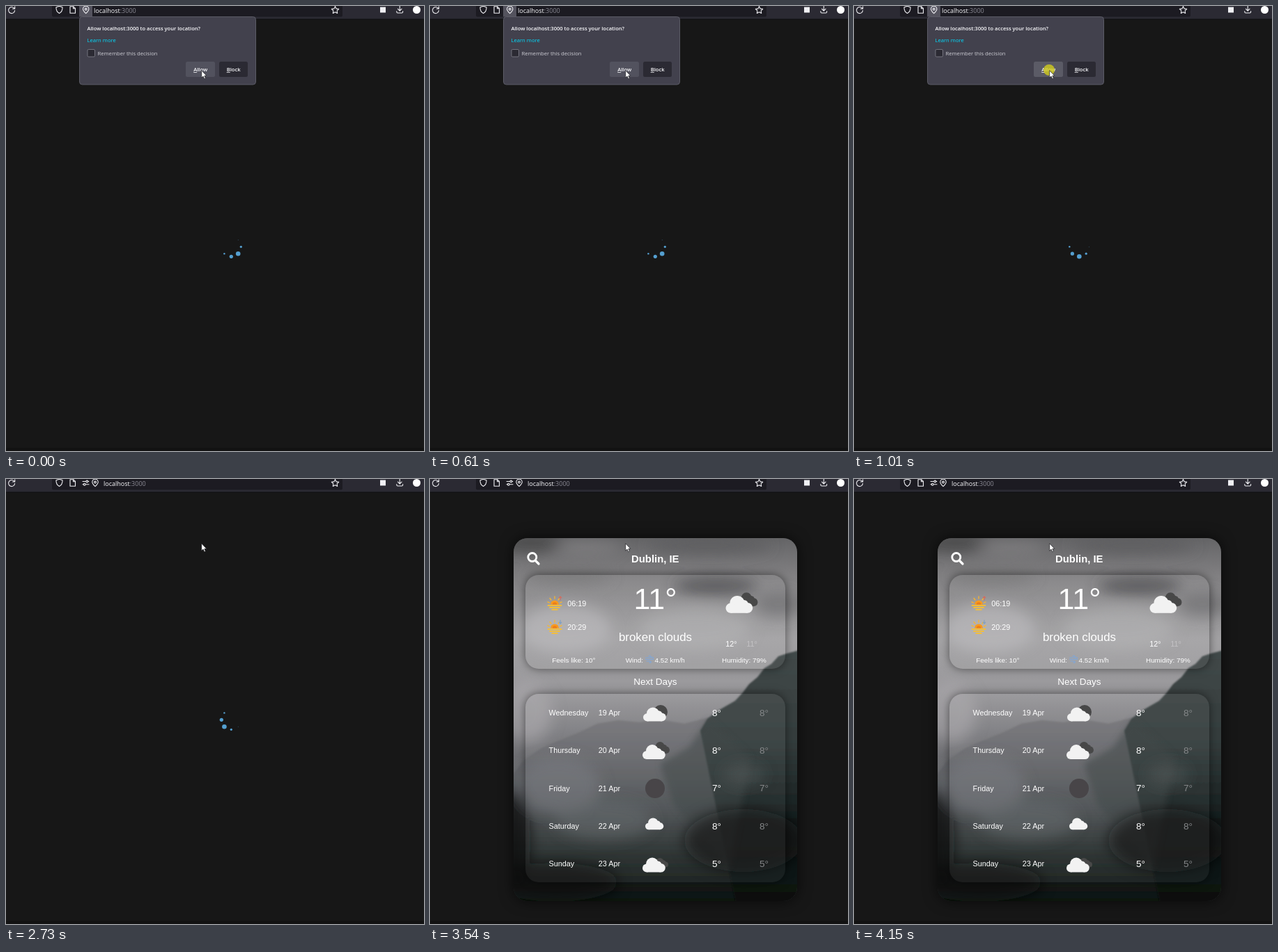
Write an HTML page that moves like this. It is 600 by 640 pixels and loops after 4.55 s.

```html
<!DOCTYPE html>
<html lang="en">
<head>
<meta charset="utf-8">
<title>Weather</title>
<style>
  html, body { margin: 0; width: 100%; height: 100%; overflow: hidden; background: #171717; }
  #stage { position: relative; width: 600px; height: 640px; overflow: hidden; }
  #stage > svg { position: absolute; left: 0; top: 0; }
  #card { position: absolute; left: 120px; top: 85px; width: 407px; height: 522px; border-radius: 20px; overflow: hidden; }
  #shade { position: absolute; left: 120px; top: 85px; width: 407px; height: 522px; border-radius: 20px; box-shadow: 0 0 20px rgba(0,0,0,.65); }
  .panel { position: absolute; left: 17px; width: 373px; border-radius: 19px; background: rgba(255,255,255,.05); box-shadow: 0 0 13px rgba(0,0,0,.5); }
  .ui { font-family: "Open Sans", "Noto Sans", sans-serif; fill: #fbfbfe; }
  .app { font-family: "Liberation Sans", Arial, sans-serif; fill: #fff; }
  .line { fill: none; stroke: #f0f0f4; stroke-width: 1.1; stroke-linecap: round; stroke-linejoin: round; }
  .key { text-decoration: underline; }
</style>
</head>
<body>
<div id="stage">
  <div id="weather">
    <div id="shade"></div>
    <div id="card">
      <svg width="407" height="522" viewBox="120 85 407 522">
        <defs>
          <linearGradient id="sky" x1="0" y1="0" x2="0" y2="1">
            <stop offset="0" stop-color="#656567"/>
            <stop offset=".12" stop-color="#858486"/>
            <stop offset=".28" stop-color="#a3a2a4"/>
            <stop offset=".42" stop-color="#99989b"/>
            <stop offset=".55" stop-color="#78787c"/>
            <stop offset="1" stop-color="#303536"/>
          </linearGradient>
          <linearGradient id="far" x1="0" y1="0" x2="0" y2="1">
            <stop offset="0" stop-color="#77767a"/>
            <stop offset=".25" stop-color="#66676b"/>
            <stop offset=".5" stop-color="#4c5053"/>
            <stop offset=".75" stop-color="#232a29"/>
            <stop offset="1" stop-color="#0a0f0d"/>
          </linearGradient>
          <linearGradient id="near" x1="0" y1="0" x2="0" y2="1">
            <stop offset="0" stop-color="#424949"/>
            <stop offset=".35" stop-color="#343d3d"/>
            <stop offset=".65" stop-color="#182020"/>
            <stop offset="1" stop-color="#0a0f0d"/>
          </linearGradient>
          <filter id="soft" x="-60%" y="-60%" width="220%" height="220%"><feGaussianBlur stdDeviation="10"/></filter>
          <filter id="edge"><feGaussianBlur stdDeviation=".8"/></filter>
          <filter id="haze" x="-30%" y="-30%" width="160%" height="160%"><feGaussianBlur stdDeviation="5"/></filter>
        </defs>
        <rect x="120" y="85" width="407" height="522" fill="url(#sky)"/>
        <g id="clouds" filter="url(#soft)"></g>
        <path filter="url(#edge)" fill="url(#far)" d="M115 430 135 404 160 387 185 376 215 364 240 352 270 347 300 350 330 346 365 352 400 343 535 330V615H115Z"/>
        <path filter="url(#edge)" fill="url(#near)" d="M388 362 398 345 412 334 424 327 438 319 449 307 458 295 470 285 480 272 490 266 500 255 512 251 535 245V615H440Z"/>
        <path filter="url(#haze)" fill="#39403f" opacity=".55" d="M400 345 372 385 330 410 350 470 430 560 460 400Z"/>
        <g id="mist" filter="url(#soft)"></g>
      </svg>
      <div class="panel" style="top:53px;height:135px"></div>
      <div class="panel" style="top:224px;height:271px"></div>
    </div>
  </div>
  <svg id="art" width="600" height="640" viewBox="0 0 600 640">
    <defs>
      <g id="cloud">
        <circle cx="14" cy="9" r="9"/><circle cx="6" cy="15" r="6"/>
        <circle cx="26.5" cy="14.7" r="6.3"/><circle cx="22" cy="10.5" r="5.5"/>
        <rect x="6" y="12" width="20.5" height="9"/>
      </g>
      <g id="pair">
        <use href="#cloud" transform="translate(15 -4) scale(.73 .8)" fill="#484848"/>
        <use href="#cloud" fill="#f2f2f2"/>
      </g>
      <g id="sun">
        <path d="M-6 1a6 6 0 0 1 12 0Z" fill="#f79a1e"/>
        <path d="M-3.2 1a3.2 3.2 0 0 1 6.4 0Z" fill="#ee7d17"/>
        <path d="M0-7.5v-3M-5-5.5-7-8M5-5.5 6.5-7.5M-7.5-1.5-10-2.7M7.5-1.5 10-2.7" stroke="#f9b52c" stroke-width="1.3" stroke-linecap="round"/>
        <path d="M-9.5 2.4H9.5M-7 5.4H7M-3.8 8.4H3.8" stroke="#fbc02d" stroke-width="1.7" stroke-linecap="round"/>
      </g>
      <g id="pin" class="line">
        <path d="M0 5.2C-2.6 2.6-4.2 1-4.2-1.1a4.2 4.2 0 0 1 8.4 0C4.2 1 2.6 2.6 0 5.2Z"/>
        <circle cy="-1" r="1.4"/>
      </g>
    </defs>

    <!-- browser bar -->
    <rect width="600" height="19" fill="#2b2a33"/>
    <rect y="18.5" width="600" height="1" fill="#0e0e11"/>
    <path d="M66 0H483V13.500a2 2 0 0 1-2 2H68a2 2 0 0 1-2-2Z" fill="#1c1b22"/>
    <rect y="635.5" width="600" height="4.500" fill="#121212"/>
    <g class="line">
      <path d="M11.600 3.200a4.500 4.500 0 1 0 1 3.300M12.700.8V4H9.500"/>
      <path d="M76.500.2 81 1.800C81.200 6 79.500 9 76.500 10.600 73.500 9 71.800 6 72 1.800Z"/>
      <path d="M92 .8h4.800l2.700 2.700v6.700H92ZM96.500 1v2.800h2.800"/>
      <path d="m472.500 .6 1.600 3.300 3.600.5-2.600 2.500.6 3.600-3.200-1.700-3.200 1.700.6-3.600-2.600-2.500 3.600-.5Z"/>
      <path d="M565.200 0V6.800M562.400 4.200l2.800 2.800 2.800-2.800M560.800 7.500v1a1.500 1.500 0 0 0 1.500 1.500h5.800a1.500 1.500 0 0 0 1.500-1.500v-1"/>
    </g>
    <rect x="537" y="1.500" width="8" height="8" fill="#f0f0f4"/>
    <circle cx="589.500" cy="5.500" r="5.500" fill="#fff"/>

    <g id="asked" class="line">
      <path d="M110 3.500h4.500M117.800 3.500h1M110 7.700h1M114.500 7.700h4.500"/>
      <circle cx="116.300" cy="3.500" r="1.400"/><circle cx="112.700" cy="7.700" r="1.400"/>
    </g>
    <rect id="lit" x="105" y="-2" width="19" height="17.500" fill="#54535e"/>
    <use id="spot" href="#pin" y="5.500"/>
    <text id="url" class="ui" y="9.500" font-size="9">localhost<tspan fill="#8d8c96">:3000</tspan></text>

    <g id="popup" class="ui" font-size="7.65">
      <rect x="105.500" y="15.500" width="253" height="97.500" rx="4" fill="#42414d" stroke="#5b5b66"/>
      <text x="116.500" y="35" font-size="7.55" font-weight="600">Allow localhost:3000 to access your location?</text>
      <text x="116.500" y="51.500" fill="#00ddff">Learn more</text>
      <rect x="117" y="62.500" width="10.500" height="10.500" rx="1.500" fill="#2b2a33" stroke="#85848f" stroke-width=".8"/>
      <text x="131.500" y="71" fill="#cfcfd6">Remember this decision</text>
      <rect id="allow" x="258" y="80" width="42" height="22" rx="2.500"/>
      <rect x="306" y="80" width="41" height="22" rx="2.500" fill="#2b2a33"/>
      <g font-weight="600" text-anchor="middle">
        <text x="279.200" y="94"><tspan class="key">A</tspan>llow</text>
        <text x="326.700" y="94"><tspan class="key">B</tspan>lock</text>
      </g>
      <circle id="press" cx="280" cy="92" r="8" fill="#d5cf1c" opacity=".78"/>
    </g>

    <g id="dots" fill="#549fd0"></g>

    <g id="info" class="app">
      <circle cx="146.800" cy="112.500" r="6" fill="none" stroke="#fff" stroke-width="2.800"/>
      <path d="m152 118 4 4" stroke="#fff" stroke-width="3.200" stroke-linecap="round"/>
      <use href="#sun" x="179" y="179.500"/>
      <use href="#sun" x="179" y="213.500"/>
      <path d="M187 174v-5m-1.800 1.800 1.800-1.800 1.800 1.800" class="line" style="stroke:#d66a5c"/>
      <path d="M187 203v5m-1.800-1.800 1.800 1.800 1.800-1.800" class="line" style="stroke:#7c9fc4"/>
      <path d="M309.500 257h6a1.500 1.500 0 1 0-1.500-1.700M309.500 259.500h9.500a1.600 1.600 0 1 0-1.500-2M311 262h5a1.200 1.200 0 1 1-1 1.700" class="line" style="stroke:#7ea6da"/>
      <use href="#pair" transform="translate(424.500 168) scale(1.18)"/>
    </g>

    <path id="cursor" d="M280.700 92.800v10.400l2.300-2.200 1.700 3.700 1.700-.8-1.600-3.500h3.100Z" fill="#fff" stroke="#16161a" stroke-width=".7"/>
  </svg>
</div>
<script>
const LOOP = 4550, CUTS = [1010, 1520, 3540];
const $ = id => document.getElementById(id);

function add(parent, tag, attrs, text) {
  const node = document.createElementNS('http://www.w3.org/2000/svg', tag);
  for (const k in attrs) node.setAttribute(k, attrs[k]);
  if (text) node.textContent = text;
  parent.appendChild(node);
  return node;
}

function blob(parent, cx, cy, rx, ry, fill, opacity = 0.7) {
  add($(parent), 'ellipse', { cx, cy, rx, ry, fill, opacity });
}

function label(text, x, y, size, more = {}) {
  add($('info'), 'text', { x, y, 'font-size': size, ...more }, text);
}

blob('clouds', 145, 92, 50, 13, '#3f3f41');
blob('clouds', 225, 98, 50, 10, '#8f8e90', 0.5);
blob('clouds', 400, 96, 90, 12, '#5a5a5c');
blob('clouds', 200, 140, 60, 11, '#707072', 0.6);
blob('clouds', 410, 154, 60, 13, '#3f4142');
blob('clouds', 500, 180, 35, 18, '#646567', 0.6);
blob('clouds', 195, 215, 65, 35, '#b7b6b8');
blob('clouds', 380, 215, 80, 30, '#b0afb1', 0.6);
blob('clouds', 140, 335, 35, 45, '#aaa9ac', 0.6);

blob('mist', 185, 440, 60, 40, '#74767a', 0.6);
blob('mist', 250, 490, 70, 28, '#606468', 0.55);
blob('mist', 450, 425, 30, 16, '#4d5555', 0.5);
blob('mist', 450, 520, 85, 45, '#0e1514', 0.75);
blob('mist', 122, 520, 22, 75, '#0b100f', 0.8);
blob('mist', 180, 580, 90, 28, '#0b100e', 0.8);

const mid = { 'text-anchor': 'middle' }, dim = { fill: '#a3a3a5' };
label('Dublin, IE', 323.3, 120, 14.85, { ...mid, 'font-weight': 'bold' });
label('11°', 323.5, 187, 43, mid);
label('broken clouds', 323.5, 233, 16.9, mid);
label('06:19', 197.3, 183, 10.8);
label('20:29', 197.3, 217, 10.8);
label('12°', 424.3, 240.7, 10.8);
label('11°', 454.3, 240.7, 10.8, { fill: '#c4c3c5' });
label('Feels like: 10°', 175.3, 264, 9.9);
label('Wind:', 280.8, 264.3, 9.9);
label('4.52 km/h', 322.5, 264.3, 9.9);
label('Humidity: 79%', 419, 264, 9.9);
label('Next Days', 323.3, 296, 13.5, mid);

['Wednesday', 'Thursday', 'Friday', 'Saturday', 'Sunday'].forEach((day, i) => {
  const y = 340.2 + i * 54.2, temp = [8, 8, 7, 8, 5][i] + '°';
  label(day, 170.6, y, 10.8);
  label(19 + i + ' Apr', 241.8, y, 10.8);
  label(temp, 405, y + 0.8, 13.6);
  label(temp, 473, y + 0.8, 13.6, { fill: '#858789' });
});

const info = $('info'), dark = '#484848', pale = '#f2f2f2';
add(info, 'circle', { cx: 331, cy: 335, r: 10, fill: dark });
add(info, 'use', { href: '#cloud', transform: 'translate(306 328.500) scale(1 .95)', fill: pale });
add(info, 'use', { href: '#pair', transform: 'translate(305 382)' });
add(info, 'circle', { cx: 323, cy: 445, r: 14, fill: '#484548' });
add(info, 'use', { href: '#cloud', transform: 'translate(309 487.500) scale(.8)', fill: pale });
add(info, 'use', { href: '#cloud', transform: 'translate(321 545) scale(.64)', fill: dark });
add(info, 'use', { href: '#cloud', transform: 'translate(305 544.500)', fill: pale });

const dots = Array.from({ length: 8 }, (_, i) => {
  const a = i * Math.PI / 4;
  return add($('dots'), 'circle', { cx: 323.3 + 14 * Math.cos(a), cy: 346.3 + 14 * Math.sin(a) });
});
const RADII = [3.3, 2.6, 1.2, 0, 0, 0, 0.4, 1.6];

function show(node, on) { $(node).style.display = on ? '' : 'none'; }

function draw(t) {
  const step = CUTS.filter(c => t >= c).length;
  const asking = step < 2, loaded = step === 3;
  show('popup', asking);
  show('lit', asking);
  show('asked', !asking);
  show('press', step === 1);
  show('dots', !loaded);
  show('weather', loaded);
  show('info', loaded);
  $('allow').setAttribute('fill', step === 1 ? '#5b5b66' : '#52525e');
  $('spot').setAttribute('x', asking ? 114.7 : 128);
  $('url').setAttribute('x', asking ? 126 : 140);
  dots.forEach((dot, i) => dot.setAttribute('r', RADII[(i - 1 - step + 16) % 8]));
}

const start = performance.now();
function tick() {
  draw((performance.now() - start) % LOOP);
  requestAnimationFrame(tick);
}
tick();
</script>
</body>
</html>
```
